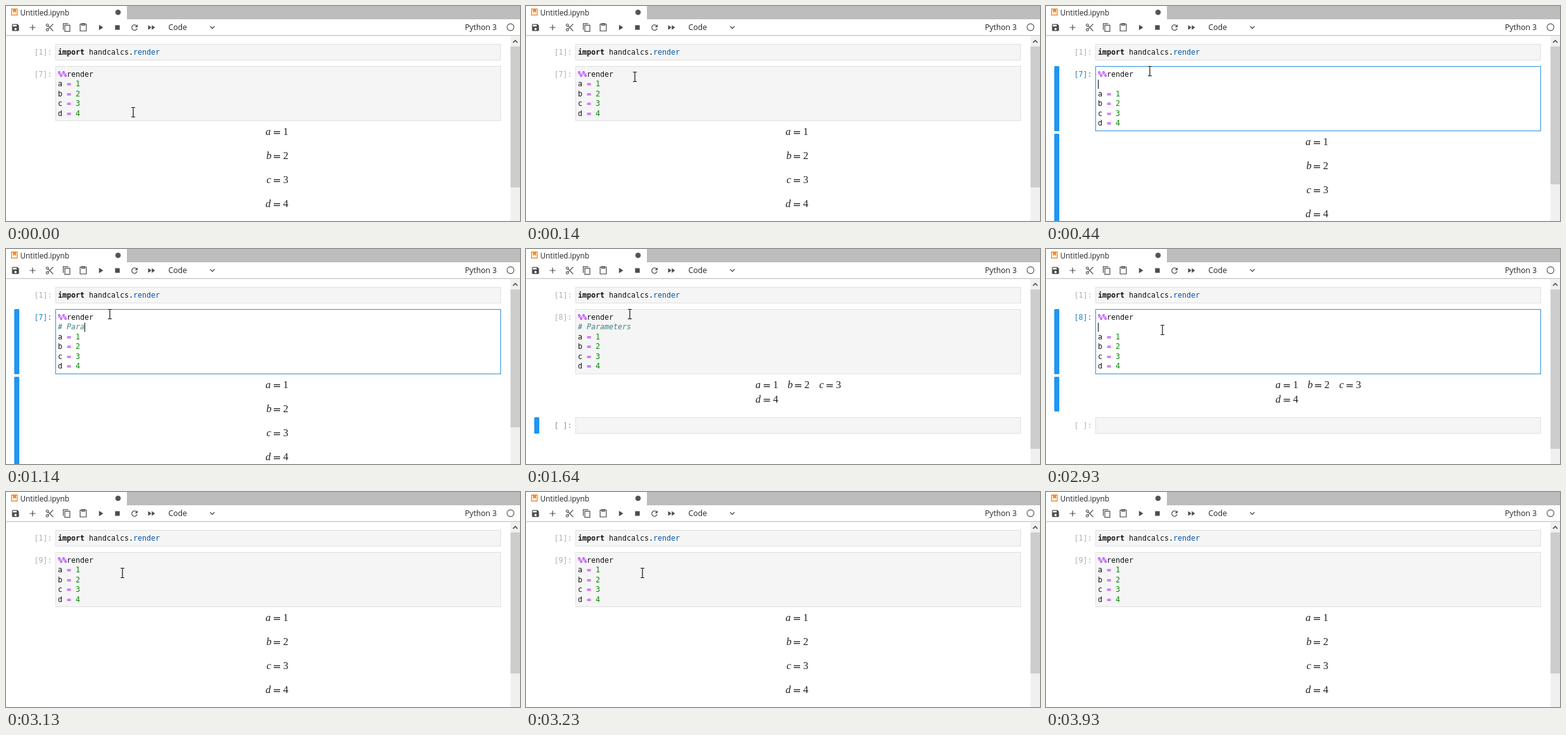
These frames come from a looping animation (812 px wide and 340 px high, 4230 ms). An HTML page:

```html
<!DOCTYPE html>
<html lang="en">
<head>
<meta charset="utf-8">
<title>Notebook</title>
<style>
  html, body { margin: 0; width: 100%; height: 100%; overflow: hidden; background: #fff; }
  svg { display: block; }
  text { white-space: pre; }
  .ui { font: 12.2px "Open Sans", "Noto Sans", sans-serif; fill: #222; }
  .code { font: 11.63px "DejaVu Sans Mono", monospace; fill: #111; }
  .math { font: 16.5px "Liberation Serif", serif; fill: #222; }
  .var { font-style: italic; }
  .equals { font: 16px "DejaVu Sans", sans-serif; }
  .keyword { font-weight: bold; }
  .operator { fill: #a2f; }
  .magic { fill: #a2f; font-weight: bold; }
  .number { fill: #080; }
  .property { fill: #05a; }
  .comment { fill: #408080; font-style: italic; }
  .line { fill: none; stroke: #4c4c4c; stroke-width: 2; }
</style>
</head>
<body>
<svg width="812" height="340" viewBox="0 0 812 340">
  <rect width="812" height="340" fill="#fff"/>
  <g id="notebook"></g>

  <rect x="191" width="621" height="21" fill="#bdbdbd"/>
  <path d="M8.7 4.7h9v9.6h-9z" fill="none" stroke="#ef8b2c" stroke-width="1.4"/>
  <path d="M11 5h5v6l-2.5-2-2.5 2z" fill="#ef8b2c"/>
  <text class="ui" x="22.5" y="15" style="font-size:11.8px">Untitled.ipynb</text>
  <circle cx="177" cy="10" r="4.3" fill="#555"/>

  <g id="icons" fill="#4c4c4c"></g>
  <text class="ui" x="256.5" y="38">Code</text>
  <path class="line" d="M322.5 32l3.5 3.5 3.5-3.5" style="stroke-width:1.3"/>
  <text class="ui" x="725" y="38">Python 3</text>
  <circle class="line" cx="797" cy="33.5" r="5.4" style="stroke-width:1.1"/>
  <path d="M0 46.5h812" stroke="#c4c4c4"/>
  <path d="M0 47.5h812" stroke="#ececec"/>

  <rect x="797" y="48" width="15" height="292" fill="#f0f0f0"/>
  <path class="line" d="M801 58l3.5-3.5 3.5 3.5" style="stroke-width:1.6"/>
  <rect id="thumb" x="797" y="64" width="15" fill="#cdcdcd"/>
  <g id="pointer"></g>
</svg>
<script>
const LOOP = 4230;
const $ = id => document.getElementById(id);

// Toolbar icons on a 24 unit grid: centre x, filled path, stroked path
const icons = [
  [15, 'M17 3H5a2 2 0 0 0-2 2v14a2 2 0 0 0 2 2h14a2 2 0 0 0 2-2V7zM12 19a3 3 0 1 1 0-6 3 3 0 0 1 0 6zM15 9H5V5h10z', ''],
  [42, '', 'M4.5 12h15M12 4.5v15'],
  [69, '', 'M8 8l13 13M8 16L21 3M9 6a3 3 0 1 1-6 0 3 3 0 1 1 6 0M9 18a3 3 0 1 1-6 0 3 3 0 1 1 6 0'],
  [96, '', 'M3 18V2h13M7 6h13v16H7z'],
  [122, '', 'M4 3h16v18H4zM8 2h8v4H8z'],
  [150, 'M7 5v14l11-7z', ''],
  [176, 'M6 6h12v12H6z', ''],
  [203, 'M20 4v7h-7z', 'M17.5 8A7 7 0 1 0 18.8 14'],
  [230, 'M3 18l8.5-6L3 6zM12.5 6v12l8.5-6z', ''],
];
$('icons').innerHTML = icons.map(([x, fill, stroke]) =>
  `<g transform="translate(${x} 34) scale(.61) translate(-12 -12)">
    <path d="${fill}"/><path class="line" d="${stroke}"/></g>`).join('');

// Each step changes part of the state and holds until the next one
const steps = [
  [0, { run: 7, comment: null, active: false, grid: false, caret: false, mouse: [201, 168], arrow: false }],
  [40, { mouse: [190, 150] }],
  [140, { mouse: [172, 112] }],
  [240, { mouse: [164, 98] }],
  [340, { mouse: [164, 103], active: true, caret: true }],
  [440, { comment: '' }],
  [640, { caret: false }],
  [740, { comment: '#', caret: true }],
  [940, { comment: '# ' }],
  [1040, { comment: '# Pa' }],
  [1140, { comment: '# Para' }],
  [1240, { comment: '# Parame' }],
  [1340, { comment: '# Paramet' }],
  [1440, { comment: '# Parameters' }],
  [1640, { run: 8, active: false, caret: false, grid: true }],
  [2130, { mouse: [178, 120] }],
  [2230, { mouse: [184, 128] }],
  [2330, { active: true, caret: true }],
  [2530, { caret: false }],
  [2630, { comment: '# Parameter', caret: true }],
  [2830, { comment: '# Param' }],
  [2930, { comment: '' }],
  [3130, { run: 9, comment: null, active: false, caret: false, grid: false }],
  [3730, { mouse: [480, 220], arrow: true }],
  [3830, { mouse: [781, 317] }],
  [3930, { mouse: null }],
];

const span = (kind, text) => `<tspan class="${kind}">${text}</tspan>`;
const code = (x, y, content, style = '') => `<text class="code" x="${x}" y="${y}" style="${style}">${content}</text>`;
const prompt = (y, label, color) => code(44.5, y, `[${label}]:`, `fill:${color}`);
const bar = (top, bottom) => `<rect x="13" y="${top}" width="8" height="${bottom - top}" rx="1.5" fill="#2196f3"/>`;
const box = (top, bottom, active) =>
  `<rect x="78.5" y="${top + .5}" width="703" height="${bottom - top - 1}"
    fill="${active ? '#fff' : '#f5f5f5'}" stroke="${active ? '#2b8fd9' : '#e0e0e0'}"/>`;

function equation(i, x, y) {
  const inset = [0, 1.3, 1.5, 0][i];
  return `<g class="math" transform="translate(${x} ${y})">
    <text class="var" x="${inset}">${'abcd'[i]}</text>
    <text class="equals" x="11.3" y="1">=</text><text x="27.7">${i + 1}</text></g>`;
}

function notebook({ run, comment, active, grid, caret }) {
  const hasComment = comment !== null;
  const bottom = hasComment ? 198 : 182;
  const lines = [span('magic', '%%') + 'render'];
  if (hasComment) lines.push(span('comment', comment));
  [...'abcd'].forEach((name, i) =>
    lines.push(`${name} ${span('operator', '=')} ${span('number', i + 1)}`));

  let out = box(60, 86) + prompt(77, 1, '#b0b0b0')
    + code(82, 77, span('keyword', 'import') + ' handcalcs.' + span('property', 'render'))
    + box(95, bottom, active) + prompt(112, run, active ? '#1f7fc4' : '#b0b0b0')
    + lines.map((line, i) => code(82, Math.round(112 + 15.4 * i), line)).join('');

  if (active) out += bar(95, bottom) + bar(bottom + 4, grid ? 257 : 345);
  if (caret) {
    const column = hasComment ? comment.length : 8;
    out += `<rect x="${82 + 7 * column}" y="${hasComment ? 116.5 : 101}" width="1" height="14.5"/>`;
  }

  const firstLine = bottom + 22;
  const places = grid
    ? [[362.5, 0], [412, 0], [461.7, 0], [362.5, 23]]
    : [0, 1, 2, 3].map(i => [410, 38 * i]);
  out += places.map(([x, dy], i) => equation(i, x, firstLine + dy)).join('');

  if (grid) {
    out += box(266, 292) + prompt(283, ' ', active ? '#b0b0b0' : '#8c8c8c');
    if (!active) out += bar(266, 292);
  }
  return out;
}

function pointer({ mouse, arrow }) {
  if (!mouse) return '';
  const shape = arrow
    ? '<path d="M.5.5v16l3.7-3.5 2.5 5.7 2.3-1-2.5-5.6h5z" fill="#fff" stroke="#000"/>'
    : '<path d="M-3-7.5h2.5l.5.5.5-.5H3M0-7v14M-3 7.5h2.5L0 7l.5.5H3" fill="none" stroke="#111" stroke-width="1.2"/>';
  return `<g transform="translate(${mouse})">${shape}</g>`;
}

let shown = -1;
const start = performance.now();
function draw(now) {
  const time = Math.max(0, now - start) % LOOP;
  const past = steps.filter(([at]) => at <= time);
  if (past.length !== shown) {
    shown = past.length;
    const state = Object.assign({}, ...past.map(([, change]) => change));
    $('notebook').innerHTML = notebook(state);
    $('pointer').innerHTML = pointer(state);
    const thumbEnd = state.grid ? 316 : state.comment === null ? 287 : 282;
    $('thumb').setAttribute('height', thumbEnd - 64);
  }
  requestAnimationFrame(draw);
}
draw(start);
</script>
</body>
</html>
```
